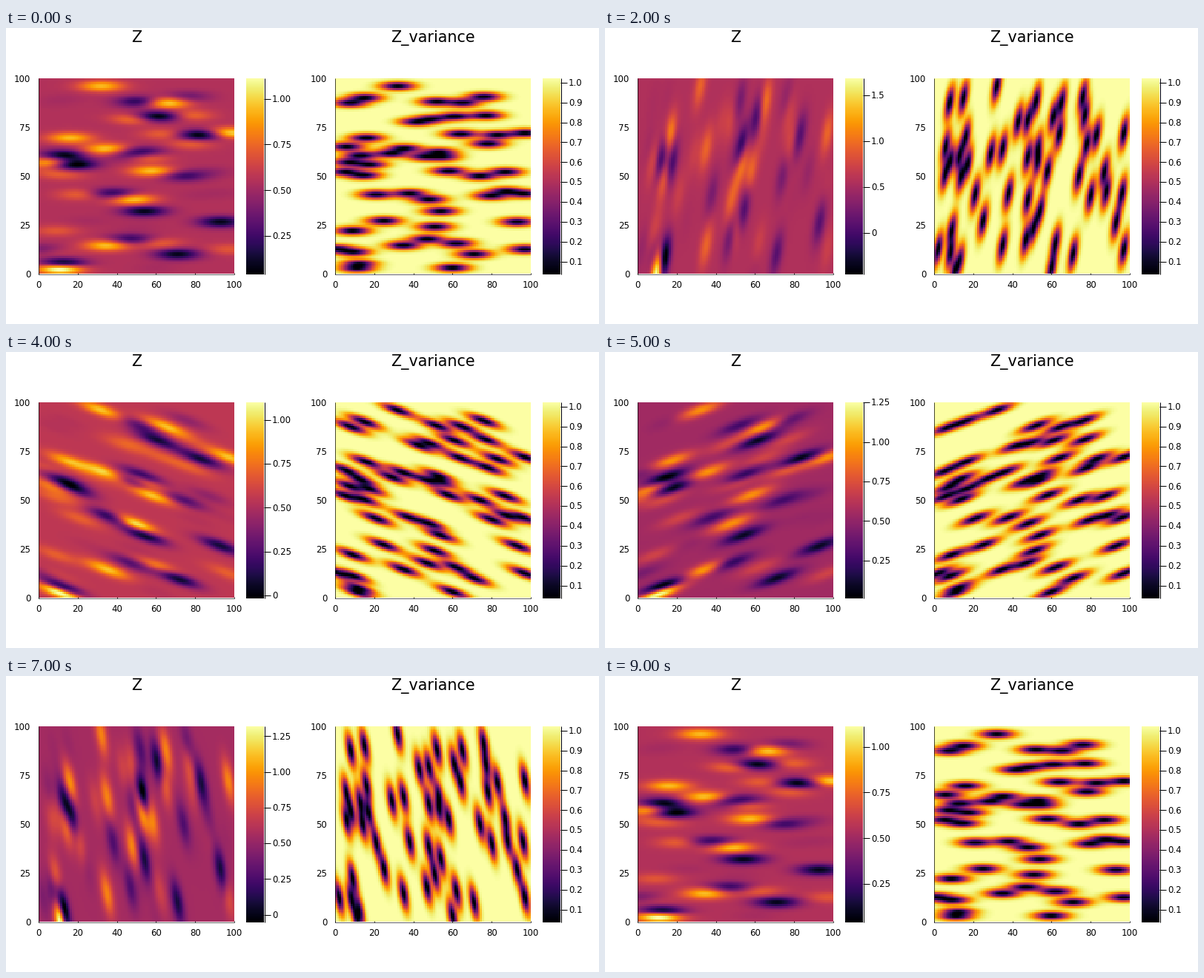
These frames come from a looping animation (800 by 400 pixels, 10000 ms). A matplotlib script:

```python
import numpy as np
import matplotlib.pyplot as plt
from matplotlib.animation import FuncAnimation

W, H, DPI = 800, 400, 100
FRAMES = 10
PX = 72 / DPI
LEFT, TOP, SIZE = 44, 68, 264
NUGGET = 0.002
RANGES = (20, 5)
VAR_LIMITS = (.035, 1.022)

plt.rcParams["font.family"] = "DejaVu Sans"

# Sample sites grouped by their measured level
LEVELS = {
    .08: [(61, 80.5), (83, 71), (13, 60.5), (17, 56), (54, 32), (71, 10),
          (93, 26.5)],
    .26: [(52, 88), (53, 62), (74, 50), (38, 41), (47, 17.7)],
    .42: [(76, 90.5), (48, 60), (87, 52), (2, 12.5), (12.1, 4.6)],
    .52: [(15, 90), (8, 87.5), (6, 65), (80, 40), (88, 42), (96, 41),
          (25, 27), (51, 24), (8.5, 11.3), (53, 60), (60, 3)],
    .70: [(77, 81), (43, 78), (48, 79), (64, 71.5), (78, 66.5), (29, 61.7),
          (8, 57), (6, 52), (14, 50.5), (21, 40.5), (9, 22), (62, 15.5),
          (97, 12.5)],
    .95: [(32, 96), (65, 87.5), (97, 72), (16, 69.5), (35, 64), (58, 52.5),
          (48, 38), (35, 14.5), (11.4, 3.2)],
}

points = np.array([p for group in LEVELS.values() for p in group])
values = np.repeat(list(LEVELS), [len(g) for g in LEVELS.values()])
centers = np.arange(100) + .5
grid = np.stack(np.meshgrid(centers, centers), -1).reshape(-1, 2)


def covariance(a, b, angle):
    """Gaussian covariance with a rotated elliptic range."""
    dx = a[:, None, 0] - b[None, :, 0]
    dy = a[:, None, 1] - b[None, :, 1]
    c, s = np.cos(angle), np.sin(angle)
    u = (c * dx + s * dy) / RANGES[0]
    v = (c * dy - s * dx) / RANGES[1]
    return (1 - NUGGET) * np.exp(-3 * (u * u + v * v))


def krige(angle):
    """Ordinary kriging: estimate and variance on the grid."""
    n = len(points)
    system = np.ones((n + 1, n + 1))
    system[:n, :n] = covariance(points, points, angle) + NUGGET * np.eye(n)
    system[n, n] = 0
    rhs = np.ones((n + 1, len(grid)))
    rhs[:n] = covariance(points, grid, angle)
    weights = np.linalg.solve(system, rhs)
    mean = values @ weights[:n]
    variance = 1 - (weights * rhs).sum(0)
    return mean.reshape(100, 100), variance.reshape(100, 100)


# One full turn of the ellipse, both ends included
FIELDS = [krige(a) for a in np.linspace(0, 2 * np.pi, FRAMES)]

fig = plt.figure(figsize=(W / DPI, H / DPI), dpi=DPI, facecolor="white")
ax = fig.add_axes([0, 0, 1, 1])


def line(xs, ys, width=1.0):
    return ax.plot(xs, ys, color="black", lw=width * PX, zorder=3,
                   solid_capstyle="butt")[0]


def label(x, y, text, ha="center", size=11.7):
    """Text centred on y by the height of its digits."""
    return ax.text(x, y + .365 * size, text, fontsize=size * PX, ha=ha,
                   va="baseline")


def tick_text(value, digits):
    if abs(value) < 1e-9:
        return "0"
    return f"{value:.{digits}f}".replace("-", "\u2212")


def bar_ticks(x0, limits, step, digits):
    """Ticks and labels beside a colour bar."""
    lo, hi = limits
    parts = []
    for k in range(int(np.ceil(lo / step)), int(np.floor(hi / step)) + 1):
        y = 333 - (k * step - lo) / (hi - lo) * 265
        parts.append(line([x0 + 348, x0 + 357], [y, y]))
        parts.append(label(x0 + 358.8, y, tick_text(k * step, digits),
                           ha="left"))
    return parts


def panel(x0, title):
    """Heat map with axes, title and colour bar; returns its image."""
    left, bottom = x0 + LEFT, TOP + SIZE
    image = ax.imshow(np.zeros((100, 100)), cmap="inferno", origin="lower",
                      interpolation="nearest", aspect="auto",
                      extent=(left, left + SIZE, bottom, TOP))
    ax.imshow(np.linspace(1, 0, 256)[:, None], cmap="inferno",
              aspect="auto", interpolation="nearest",
              extent=(x0 + 324, x0 + 348, 333, TOP), origin="upper")
    line([x0 + 348.5] * 2, [TOP, 333])
    line([left + .3] * 2, [TOP, bottom + .5], .7)
    line([left, left + SIZE], [bottom + .5] * 2, .6)
    for v in range(0, 101, 20):
        x = left + v * SIZE / 100
        line([x, x], [bottom - 1, bottom + .5], .8)
        label(x, 346.6, str(v))
    for v in range(0, 101, 25):
        label(x0 + 33.3, bottom + .3 - v * SIZE / 100, str(v), ha="right")
    label(x0 + 176, 11, title, size=20.7)
    return image


z_image = panel(0, "Z")
var_image = panel(400, "Z_variance")
var_image.set_clim(*VAR_LIMITS)
bar_ticks(400, VAR_LIMITS, .1, 1)

ax.set_xlim(0, W)
ax.set_ylim(H, 0)
ax.axis("off")

z_ticks = []


def update(i):
    while z_ticks:
        z_ticks.pop().remove()
    mean, variance = FIELDS[i]
    limits = mean.min(), mean.max()
    z_image.set_data(mean)
    z_image.set_clim(*limits)
    var_image.set_data(variance)
    wide = limits[1] - limits[0] > 2
    z_ticks.extend(bar_ticks(0, limits, .5 if wide else .25, 1 if wide else 2))
    return [z_image, var_image, *z_ticks]


anim = FuncAnimation(fig, update, frames=FRAMES, init_func=lambda: update(0),
                     interval=1000, repeat=True, repeat_delay=0, blit=False)
plt.show()
```
